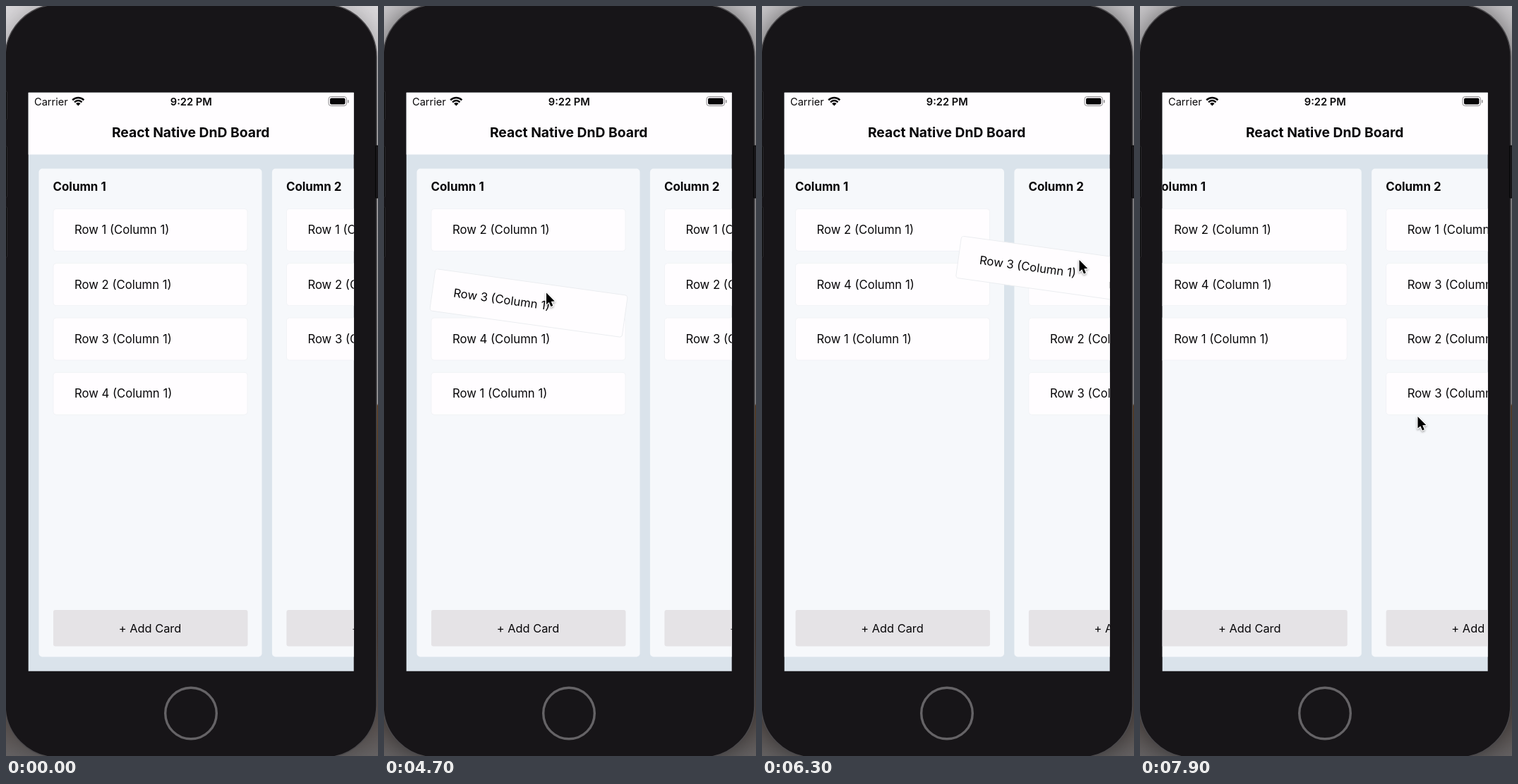
An HTML page with a canvas that plays this animation: 527 by 1063 pixels, repeating every 8 s.

```html
<!DOCTYPE html>
<html lang="en">
<head>
<meta charset="utf-8">
<title>Drag and drop board</title>
<style>
  html, body { margin: 0; width: 100%; height: 100%; overflow: hidden; background: #171518; }
  canvas { display: block; width: 527px; height: 1063px; }
</style>
</head>
<body>
<canvas id="stage"></canvas>
<script>
const W = 527, H = 1063, LOOP = 8000, TICK = 100;
const canvas = document.getElementById('stage');
const ctx = canvas.getContext('2d');
const dpr = window.devicePixelRatio || 1;
canvas.width = W * dpr;
canvas.height = H * dpr;

const FONT = 'Inter, Roboto, sans-serif';
const INK = '#080709', PAPER = '#fffdff', BODY = '#171518';
const PITCH = 330.4, ROW = 77.3, CARD_W = 275, CARD_H = 60;
const TILT = 7.9 * Math.PI / 180;
const LAG = 100, FOCUS = 800, SCROLL_STEP = 9.75, SCROLL_COUNT = 5;

const mix = (a, b, k) => a + (b - a) * k;
function ease(k) {
  k = Math.min(1, Math.max(0, k));
  return k * k * (3 - 2 * k);
}

// Pointer legs: each eases to (x, y), bowed sideways by bend.
const legs = [];
const go = (start, end, x, y, bend = [0, 0]) => legs.push({ start, end, x, y, bend });

// Reorder steps: at a time, a card takes an index in a column.
const steps = [];
const put = (time, card, col, index) => steps.push({ time, card, col, index });

const makeCard = (row, home) => ({ name: `Row ${row} (Column ${home})` });
const first = [1, 2, 3, 4].map(n => makeCard(n, 1));
const second = [1, 2, 3].map(n => makeCard(n, 2));

go(0, 600, 180, 304, [0, -450]);
for (let i = 1; i <= 3; i++) {
  const end = 1500 + 500 * i;
  go(end - 250, end, 180, 304 + ROW * i);
  put(end - 150, first[0], 0, i);
}
go(3400, 4100, 230, 406.5, [200, 150]);
go(4700, 5200, 468, 567);
put(5050, first[2], 1, 3);
go(5300, 6200, 449.5, 360, [20, -60]);
for (let i = 0; i < 3; i++) put(5600 + 150 * i, first[2], 1, 2 - i);
go(6350, 6600, 439, 358);
go(6680, 6920, 443, 404);
put(6850, first[2], 1, 1);
go(7500, 7900, 393.5, 582);

const drags = [
  { card: first[0], start: 1100, end: 3500, grab: [31.5, 34] },
  { card: first[2], start: 4400, end: 7450, grab: [-25, 14.5] }
];

function pointer(t) {
  let x = 540, y = 1090;
  for (const leg of legs) {
    if (t < leg.start) break;
    const k = ease((t - leg.start) / (leg.end - leg.start));
    const bow = Math.sin(Math.PI * k);
    x = mix(x, leg.x, k) + leg.bend[0] * bow;
    y = mix(y, leg.y, k) + leg.bend[1] * bow;
  }
  return [x, y];
}

function scroll(t) {
  let x = 0;
  for (let i = 0; i < SCROLL_COUNT; i++) x += SCROLL_STEP * ease((t - 5000 - 650 * i) / 300);
  return x;
}

function layout(count) {
  const cols = [[...first], [...second]];
  for (const { card, col, index } of steps.slice(0, count)) {
    for (const list of cols) {
      const at = list.indexOf(card);
      if (at >= 0) list.splice(at, 1);
    }
    cols[col].splice(index, 0, card);
  }
  return cols;
}

function box(x, y, w, h, r, fill, stroke) {
  ctx.beginPath();
  ctx.roundRect(x, y, w, h, r);
  if (fill) { ctx.fillStyle = fill; ctx.fill(); }
  if (stroke) { ctx.strokeStyle = stroke; ctx.lineWidth = 1; ctx.stroke(); }
}

function label(str, x, y, size, weight = 400, align = 'left') {
  ctx.font = `${weight} ${size}px ${FONT}`;
  ctx.textAlign = align;
  ctx.fillStyle = INK;
  ctx.fillText(str, x, y);
}

function drawCard(card, x, y, angle = 0) {
  ctx.save();
  ctx.translate(x, y);
  ctx.rotate(angle);
  box(-CARD_W / 2, -CARD_H / 2, CARD_W, CARD_H, 4, PAPER, angle ? '#ebedf0' : '#f1f3f6');
  label(card.name, -107.5, 6, 16.7);
  ctx.restore();
}

function backdrop(t) {
  const focused = t >= FOCUS;
  const g = ctx.createLinearGradient(0, 0, 0, H);
  g.addColorStop(0, focused ? '#cbc9cc' : '#dddbde');
  g.addColorStop(0.53, focused ? '#b5b3b6' : '#c4c2c5');
  g.addColorStop(0.533, '#744a25');
  g.addColorStop(0.65, '#604025');
  g.addColorStop(0.84, '#4a3428');
  g.addColorStop(1, '#666364');
  ctx.fillStyle = g;
  ctx.fillRect(0, 0, W, H);
}

function phone(t) {
  ctx.save();
  ctx.shadowColor = `rgba(0,0,0,${t >= FOCUS ? 0.55 : 0.3})`;
  ctx.shadowBlur = 40 * dpr;
  box(-1, -2, 526, 1067, 74, BODY);
  ctx.restore();
  ctx.strokeStyle = '#4b494c';
  ctx.lineWidth = 1.5;
  ctx.stroke();
  for (const [y, h] of [[121, 40], [199, 72], [285, 71]]) box(-2, y, 3.5, h, 1, '#050505', '#2c2a2d');
  box(523.5, 198, 5, 74, 1, BODY, '#050505');
  ctx.beginPath();
  ctx.arc(262, 1002.5, 36.3, 0, Math.PI * 2);
  ctx.strokeStyle = '#656366';
  ctx.lineWidth = 3.4;
  ctx.stroke();
}

function wifi(x, y) {
  const a = -Math.PI * 0.75, b = -Math.PI * 0.25;
  ctx.strokeStyle = ctx.fillStyle = INK;
  ctx.lineWidth = 2.5;
  for (const r of [11.4, 7.4]) {
    ctx.beginPath();
    ctx.arc(x, y, r, a, b);
    ctx.stroke();
  }
  ctx.beginPath();
  ctx.moveTo(x, y);
  ctx.arc(x, y, 4.6, a, b);
  ctx.fill();
}

function header() {
  ctx.fillStyle = PAPER;
  ctx.fillRect(31, 122, 463, 88.5);
  label('Carrier', 40, 141, 14.6);
  wifi(102.3, 141.5);
  label('9:22 PM', 262.3, 141, 14.7, 600, 'center');
  box(457, 128.5, 25.5, 13, 3.5, null, '#8d8b8e');
  box(459, 130.5, 21.5, 9, 2, INK);
  box(484, 133, 1.5, 4.5, 1, '#8d8b8e');
  label('React Native DnD Board', 261.7, 186.3, 19.3, 700, 'center');
}

function column(i, dx) {
  const x = 46.5 + i * PITCH - dx;
  box(x, 230.5, 316, 692, 5, '#f6f8fb');
  label(`Column ${i + 1}`, x + 20, 262, 16.9, 700);
  box(x + 20.5, 856, 275.5, 51.5, 3, '#e5e3e6');
  label('+ Add Card', x + 157.5, 888, 16.4, 400, 'center');
}

function board(t) {
  const dx = scroll(t);
  ctx.fillStyle = '#dae3eb';
  ctx.fillRect(31, 122, 463, 822);

  const held = drags.find(d => t >= d.start && t < d.end);
  const done = steps.filter(s => s.time <= t).length;
  const before = layout(Math.max(0, done - 1));
  const k = done ? ease((t - steps[done - 1].time) / 150) : 1;

  layout(done).forEach((list, col) => {
    column(col, dx);
    list.forEach((card, i) => {
      if (held && held.card === card) return;
      const old = before[col].indexOf(card);
      const slot = old < 0 ? i : mix(old, i, k);
      drawCard(card, 204.5 + col * PITCH - dx, 317.4 + slot * ROW);
    });
  });

  if (held) {
    const [x, y] = pointer(t - LAG);
    drawCard(held.card, x + held.grab[0] - Math.min(dx, SCROLL_STEP), y + held.grab[1], TILT);
  }
}

function arrow(x, y) {
  ctx.save();
  ctx.translate(x, y);
  const shape = new Path2D('M0 0V16.6L3.8 13.2 6.5 19.4 9.3 18.2 6.7 12.2 11.8 12Z');
  ctx.lineJoin = 'round';
  ctx.lineWidth = 2.4;
  ctx.strokeStyle = '#fff';
  ctx.shadowColor = 'rgba(0,0,0,0.35)';
  ctx.shadowBlur = 3 * dpr;
  ctx.shadowOffsetY = 1.5 * dpr;
  ctx.stroke(shape);
  ctx.shadowColor = 'transparent';
  ctx.fillStyle = '#000';
  ctx.fill(shape);
  ctx.restore();
}

function draw(t) {
  ctx.setTransform(dpr, 0, 0, dpr, 0, 0);
  backdrop(t);
  phone(t);
  ctx.save();
  ctx.beginPath();
  ctx.rect(31.7, 122.7, 461, 820);
  ctx.clip();
  board(t);
  header();
  ctx.restore();
  arrow(...pointer(t));
}

const start = performance.now();
function frame() {
  const t = (performance.now() - start) % LOOP;
  draw(Math.floor(t / TICK) * TICK);
  requestAnimationFrame(frame);
}
frame();
</script>
</body>
</html>
```
